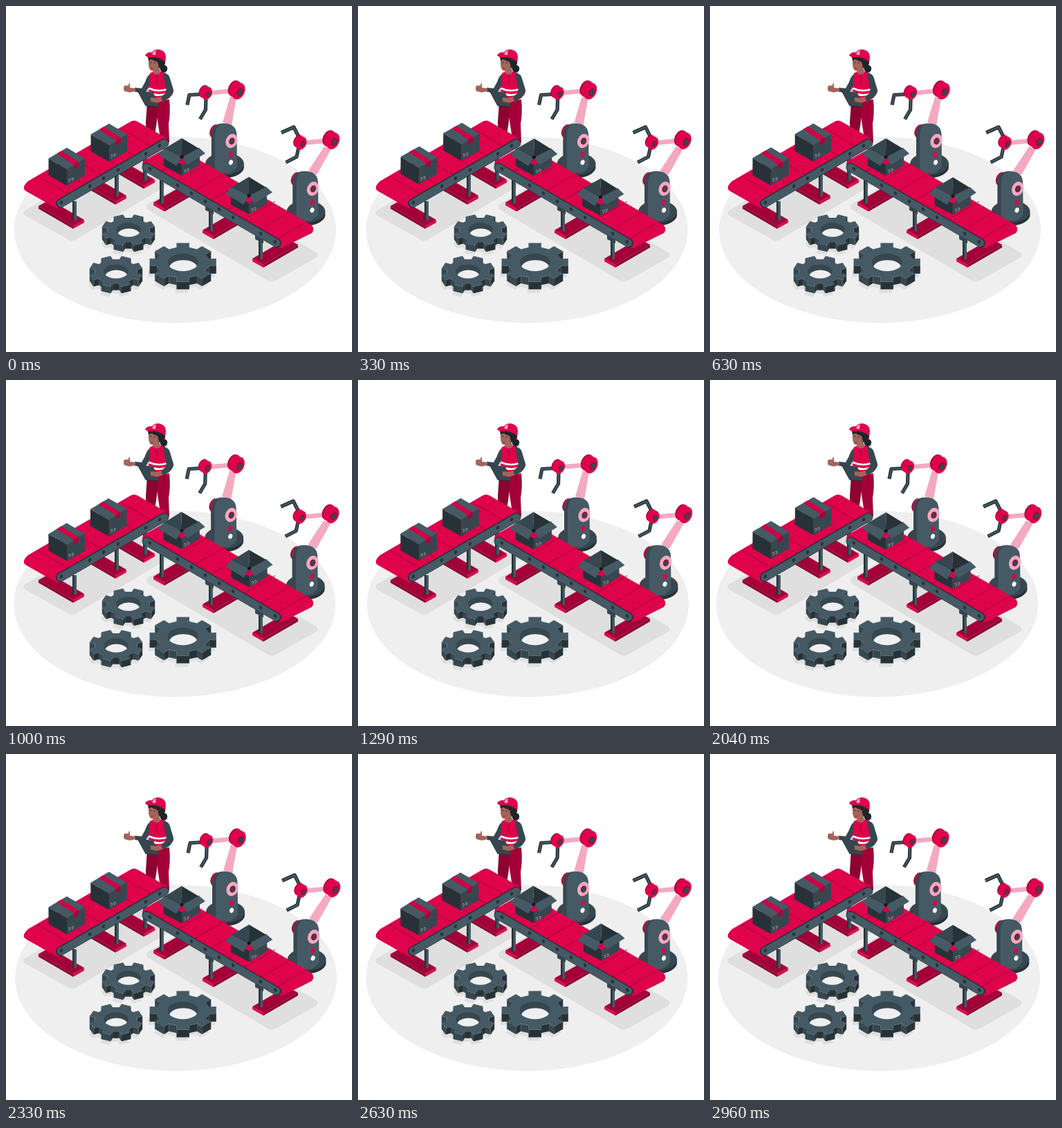
An HTML page for the animation above (3000 ms loop, 500 px wide and 500 px high).

```html
<!DOCTYPE html>
<html lang="en">
<head>
<meta charset="utf-8">
<title>Factory line</title>
<style>
html, body { margin: 0; width: 100%; height: 100%; overflow: hidden; background: #fff; }
svg { display: block; width: 100vw; height: 100vh; }
</style>
</head>
<body>
<svg id="stage" viewBox="0 0 500 500"></svg>
<script>
const RED = '#de034b', MAROON = '#a30238', WINE = '#8c0230', PINK = '#f4a9c0';
const STEEL = '#455a64', SLATE = '#37474f', INK = '#263238', SKIN = '#a5645a';
const FLOOR = '#efefef', SHADOW = '#dfdfdf';
const SLOPE = 0.578;

const path = (d, fill, extra = '') => `<path d="${d}" fill="${fill}" ${extra}/>`;
const poly = (points, fill) => `<polygon points="${points}" fill="${fill}"/>`;
const line = (d, color, width, cap = 'butt') =>
  `<path d="${d}" fill="none" stroke="${color}" stroke-width="${width}" stroke-linecap="${cap}" stroke-linejoin="round"/>`;
const oval = (x, y, rx, ry, fill, turn = 0) =>
  `<ellipse cx="${x}" cy="${y}" rx="${rx}" ry="${ry}" fill="${fill}" transform="rotate(${turn} ${x} ${y})"/>`;
const at = (x, y, body) => `<g transform="translate(${x} ${y})">${body}</g>`;
const range = n => Array.from({ length: n }, (_, i) => i);

const shadows =
  path('M28 295L180 208L238 242Q242 254 230 261L102 337Q96 342 89 337L28 303Q22 299 28 295Z', SHADOW) +
  path('M206 285L268 250L448 356Q453 360 448 364L391 396Q384 401 377 396L206 295Q200 290 206 285Z', SHADOW);

// Plate and post; dir 1 runs down to the right, -1 mirrors it.
function support(x, y, top, dir) {
  const body = poly('-50,-29 -34,-38 16,-9 0,0', MAROON) +
    poly('-50,-29 0,0 0,4 -50,-25', WINE) + poly('0,0 16,-9 16,-5 0,4', RED);
  const post = `<rect x="-3" y="${top}" width="6" height="${-top - 8}" fill="${STEEL}"/>` +
    `<rect x="-3" y="${top}" width="2.5" height="${-top - 8}" fill="${INK}"/>`;
  return at(x, y, `<g transform="scale(${dir} 1)">${body}</g>` + at(dir > 0 ? 2 : -4, 0, post));
}

function holes(xs, x0, y0, slope) {
  return xs.map(x => oval(x, y0 + slope * (x - x0), 2, 2.7, INK, slope < 0 ? 25 : -25)).join('');
}

function beltLeft() {
  const seams = range(6).map(i => {
    const x = 165 - i * 24, y = 165 + (185 - x) * SLOPE;
    return `M${x} ${y}l46 26.6`;
  }).join('');
  return path('M180 167Q185 164 190 167L232 191L235 198L74 293L28 267Q22 262 32 253Z', RED) +
    line(seams, MAROON, 1) +
    line('M78.5 285L229 198', INK, 13, 'round') +
    line('M79.5 285L229 198.6', STEEL, 11, 'round') +
    holes([80, 121, 141, 162, 202, 222], 80, 284, -SLOPE);
}

function beltRight() {
  const seams = range(8).map(i => {
    const x = 224 + i * 24;
    return `M${x} ${230 + (x - 208) * SLOPE}l45 -26`;
  }).join('');
  return path('M197 229Q197 225 202 222L236 203Q243 201 249 205L441 316Q447 322 442 328L398 350Z', RED) +
    line(seams, MAROON, 1) +
    line('M203 233L391.5 342.5', INK, 13, 'round') +
    line('M203 233.4L390.5 342.5', STEEL, 11, 'round') +
    holes([208, 248, 268, 288, 308, 328, 368, 389], 208, 235.5, 0.583);
}

const label = line('M-2.5 -1a1.3 1.3 0 1 1 1.5 1.2l-.5 2M1.8 -2.5a1.3 1.3 0 1 1 1.3 1.2l-.5 2', '#b9c2c6', 0.7);

const closedBox =
  poly('0,0 26,15.5 0,31.5 -26.5,15.5', STEEL) +
  poly('-26.5,15.5 0,31.5 0,55 -26.5,40', INK) +
  poly('26,15.5 0,31.5 0,55 26,40', SLATE) +
  poly('-14.5,8.5 -8,4.5 16.5,20 16.5,27 10,31 10,24.5', '#cf0446') +
  poly('10,24.5 16.5,20 16.5,27 10,31', MAROON) +
  at(5, 47.5, label);

const openBox =
  poly('-26,25 0,38 0,54 -26,40', INK) +
  poly('26,25 0,38 0,54 26,39', SLATE) +
  poly('-25,15 0,0 0,28', SLATE) + poly('25,15 0,0 0,28', INK) +
  poly('-25,14 0,27 -8,40 -34,24', STEEL) +
  poly('25,14 0,27 8,38 34,22', STEEL) +
  line('M-25 14L0 27L25 14', INK, 0.6) +
  oval(0, 27, 2.6, 2.2, '#0b1013') +
  at(6, 48, label);

function gear(cx, cy, radius, depth, phase) {
  const squash = 0.58, root = radius * 0.79, points = [];
  for (let i = 0; i < 8; i++) {
    const mid = phase + i * Math.PI / 4;
    [[-0.235, root], [-0.19, radius], [0.19, radius], [0.235, root]].forEach(([da, r]) =>
      points.push([cx + r * Math.cos(mid + da), cy + r * squash * Math.sin(mid + da)]));
  }
  const outline = points.map(p => p.map(v => v.toFixed(1))).join(' ');
  const sides = points.map((a, i) => [a, points[(i + 1) % points.length]])
    .filter(([a, b]) => a[0] > b[0] - 0.01)
    .sort((p, q) => p[0][1] + p[1][1] - q[0][1] - q[1][1])
    .map(([a, b]) => poly(`${a} ${b} ${b[0]},${b[1] + depth} ${a[0]},${a[1] + depth}`,
      b[1] - a[1] < -1 ? SLATE : INK)).join('');
  const rx = radius * 0.45, ry = rx * squash, id = 'hole' + cx;
  return at(-2, depth + 5, poly(outline, SHADOW)) +
    sides + poly(outline, STEEL) +
    `<clipPath id="${id}">${oval(cx, cy, rx, ry, '#000')}</clipPath>` +
    oval(cx, cy, rx, ry, SLATE) +
    `<g clip-path="url(#${id})">${oval(cx + 0.5, cy + depth * 0.75, rx * 0.92, ry * 0.9, FLOOR)}</g>`;
}

function worker() {
  return path('M204 139L221 140L219 160L213 200L203 200L202 168Z', WINE) +
    path('M218 137L236 135Q238 155 235 170L236 197L223 192L219 165Z', MAROON) +
    path('M210 97Q204 100 201 110L196 119L186 118L186 124L201 126Q208 116 212 106Z', SLATE) +
    path('M208 97L215 94L228 95Q234 101 233 112L234 131Q220 138 205 129L207 113Z', RED) +
    line('M206.5 119Q220 125 233.5 120M206 125Q220 132 234 126', '#fff', 2.6) +
    line('M217 97L219 116', MAROON, 0.8) +
    path('M211 89L222 88L223 97Q217 101 213 97Z', SKIN) +
    path('M206 74L222 74L223 88Q216 96 209 93Q206 90 206 83Z', SKIN) +
    path('M205 74Q213 71 230 76Q232 84 225 91L221 89L219 81L214 79L210 77L206 79Z', '#20252b') +
    oval(228, 90.5, 5.2, 5.6, '#20252b') +
    line('M208 82l2.5 -.8M213.5 82.5l2 .4', '#20252b', 1) + line('M209 90l4 .2', '#6f3835', 0.8) +
    path('M201 71Q205 66 211 67Q215 62 222 63Q231 65 231 74L230 81Q221 73 210 74Q204 75 201 71Z', RED) +
    path('M213 66L217 64L216 71L211 70Z', PINK) +
    path('M187 119L179 118L179 112Q177 110 177 115L171 115Q169 119 171 123L179 125L187 123Z', SKIN) +
    path('M190 122L213 125L221 146L202 144Z', SLATE) + line('M190 122L202 144L221 146', INK, 1.2) +
    path('M209 132L217 133L227 130L230 136L219 140L209 138Z', SKIN) +
    path('M227 96Q236 97 238 108L242 121Q243 126 236 133L227 138L224 132L232 124L230 113Z', SLATE);
}

function joint(x, y, size) {
  return at(x, y, `<g transform="scale(${size})">` +
    oval(-4, -3, 8.5, 12, MAROON, 25) + oval(-2.5, -2, 8.5, 12, RED, 25) +
    oval(2, 1, 9, 12.5, RED, 25) + oval(4, 2.5, 4.2, 6.2, MAROON, 25) +
    oval(4.5, 2.8, 3, 4.8, SLATE, 25) + '</g>');
}

const robotBody =
  oval(316, 232.5, 28, 16, INK) + oval(316, 228, 28, 16, SLATE) +
  oval(301.5, 181, 6.8, 10, MAROON, 20) + oval(303, 181, 6.5, 9.5, RED, 20) +
  path('M297 185Q297 170 315 169.5Q333.5 170 333.5 187L334 232Q326 244 312 242Q300 240 297 234Z', STEEL) +
  path('M297 186Q297 172 311 170Q302 175 302 187L302 239Q298 237 297 234Z', SLATE) +
  oval(326, 195, 8.3, 10.5, PINK, 22) + oval(326.5, 195.3, 4, 5.2, MAROON, 22) +
  oval(326.8, 195.5, 2.8, 4, SLATE, 22) +
  oval(325, 215, 2.9, 3.9, RED, 20) + oval(325, 226, 2.9, 3.7, '#fff', 20);

const armTop = line('M297 125.5L329 122.5', PINK, 6.5) + joint(334, 122, 1) + joint(289, 125.5, 0.78);

function grip(d) {
  return line(d, INK, 5.2) + line(d, STEEL, 2);
}

const robots =
  poly('313,168 326,173 333,133 324,131', PINK) + robotBody +
  grip('M262 143L265 128.5L283 127.5') + grip('M280.5 163.5L288.5 150L289 134') + armTop +
  poly('437,238 449,244 470,207 460,203', PINK) + at(117.5, 69, robotBody) +
  grip('M398 183L416 175L424 191') + grip('M404.5 226L420 218L423 204') + at(136.5, 72, armTop);

document.getElementById('stage').innerHTML =
  `<g class="shake">${oval(244.5, 323.5, 232.5, 134.5, FLOOR)}</g>` + shadows +
  `<g class="shake">${robots}</g>` + worker() +
  support(97, 318, -36, 1) + support(158, 283, -40, 1) + support(199, 260, -40, 1) +
  support(229, 293, -42, -1) + support(300, 333, -40, -1) + support(372, 374, -40, -1) +
  poly('288,288 300,294 300,301 288,295', SLATE) + poly('360,329 372,335 372,343 360,337', SLATE) +
  beltRight() + beltLeft() +
  '<g id="boxes">' +
  at(149, 170, closedBox) + at(88, 205, closedBox) + at(254, 191, openBox) + at(351, 247, openBox) + '</g>' +
  gear(177, 323.5, 39, 9.5, Math.PI / 8) + gear(159, 383.5, 39, 9.5, Math.PI / 8) +
  gear(255.7, 370.5, 49, 11, 0);

const shaking = document.querySelectorAll('.shake');
const boxes = document.getElementById('boxes');
const LOOP = 3000, FPS = 24;
const SHAKE = [0, -1, 2, -4, 4, -4, 4, -4, 2, -1, 0];

function shakeAt(p) {
  const i = Math.floor(p * 10), f = p * 10 - i;
  return SHAKE[i] + (SHAKE[i + 1] - SHAKE[i]) * f;
}

// Triangle wave: 0, 1, 0, -1 at the quarters.
const swayAt = p => 1 - 4 * Math.abs(((p + 0.25) % 1) - 0.5);

function draw(ms) {
  const frame = Math.floor(((ms + 5) % LOOP) * FPS / 1000);
  const p = (frame + 0.5) / (LOOP * FPS / 1000);
  const dx = shakeAt(p).toFixed(3);
  shaking.forEach(g => g.setAttribute('transform', `translate(${dx} 0)`));
  boxes.setAttribute('transform', `rotate(${swayAt((p * 2) % 1).toFixed(4)} 223.5 235.5)`);
}

const start = performance.now();
function tick() {
  draw(performance.now() - start);
  requestAnimationFrame(tick);
}
tick();
</script>
</body>
</html>
```
